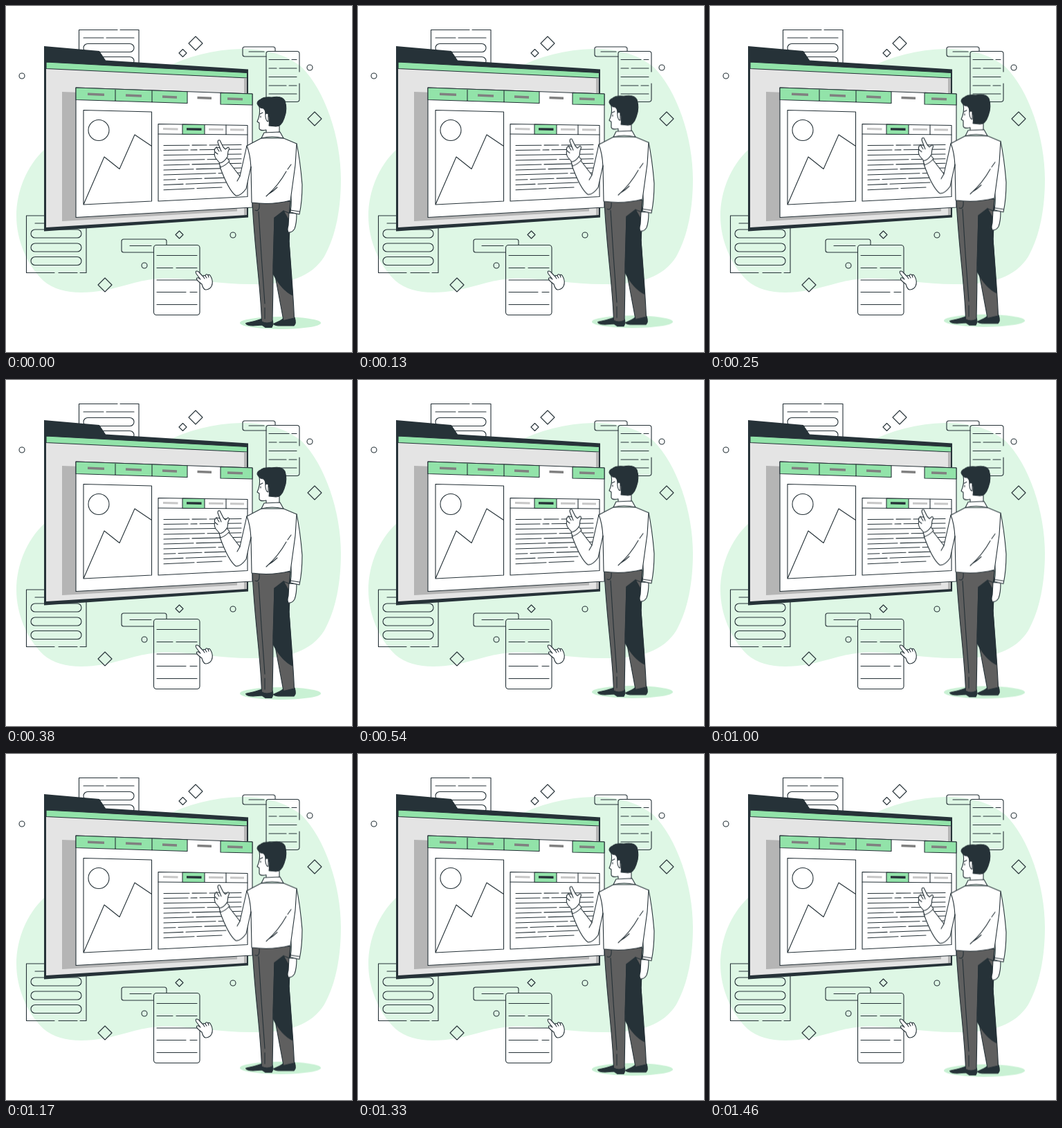
Write an HTML page without scripts that moves like this. It is 500 by 500 pixels and loops after 1.5 s.

```html
<!DOCTYPE html>
<html lang="en">
<head>
<meta charset="utf-8">
<title>Man at a tabbed window</title>
<style>
  html, body { margin: 0; width: 100%; height: 100%; overflow: hidden; background: #fff; }
  svg { display: block; width: 100vw; height: 100vh; }
  .line { fill: none; stroke: #263238; stroke-width: 1.1; stroke-linecap: round; stroke-linejoin: round; }
  .white { fill: #fff; }
  .green { fill: #92e3a9; }
  .dark { fill: #263238; }
  .grey { fill: #5f5f5f; }
  .bar { fill: none; stroke: #808080; stroke-width: 3.4; }
  .pale { stroke: #c7c7c7; stroke-width: 3; }
  .man { animation: float 1.5s linear infinite; }
  @keyframes float { 50% { transform: translateY(-10px); } }
</style>
</head>
<body>
<svg viewBox="0 0 500 500">
  <defs>
    <path id="diamond" class="line" d="M0-10 10 0 0 10-10 0Z"/>
    <path id="small-diamond" class="line" d="M0-5.5 5.5 0 0 5.5-5.5 0Z"/>
    <circle id="ring" class="line" r="4"/>
    <rect id="pill" class="line" width="73" height="12" rx="6"/>
  </defs>

  <path fill="#def7e5" d="M55 208C30 231 15 268 15 303C15 338 30 374 54 397C75 415 106 417 141 411C174 405 190 396 222 394C265 392 310 403 360 402C408 402 441 392 460 362C477 332 484 292 484 250C484 190 461 122 427 88C402 68 372 62 340 62C300 63 262 72 225 92Z"/>

  <!-- Cards -->
  <g class="line">
    <path d="M105.500 90V34.500H161M165 34.500H192V90M112 46H141M145 46H185"/>
    <path d="M29.500 303V385.500H70M76 385.500H103M107 385.500H116V303H29.500M42 314H56"/>
    <path d="M213.500 356H170Q167 356 167 353V340Q167 337 170 337H229Q232 337 232 340V345.500M179 346.500H210"/>
    <rect x="213.500" y="345.500" width="66.500" height="101" rx="4"/>
    <path d="M218 360.500H276M218 378.500H241M246 378.500H276M218 396H276M218 413.500H260M266 413.500H276M218 431.500H276"/>
    <path d="M376 73H345Q342 73 342 70V62Q342 59 345 59H386Q389 59 389 62V65.500M351 66H373"/>
    <path d="M424 95V69Q424 65.500 420.500 65.500H379.500Q376 65.500 376 69V135Q376 138.500 380 138.500H420Q424 138.500 424 135V112"/>
    <path d="M380 77.500H409M413 77.500H420M380 90H391M395 90H420M380 102.500H420M380 115H405M409 115H420M380 127H420"/>
  </g>
  <use href="#pill" x="112" y="54.500"/>
  <use href="#pill" x="112" y="73.500"/>
  <use href="#pill" x="36" y="323"/>
  <use href="#pill" x="36" y="343"/>
  <use href="#pill" x="36" y="362.500"/>

  <use href="#diamond" x="274" y="54"/>
  <use href="#diamond" x="446" y="163"/>
  <use href="#diamond" x="143" y="403"/>
  <use href="#small-diamond" x="255.500" y="68"/>
  <use href="#small-diamond" x="250.500" y="330.500"/>
  <use href="#ring" x="23" y="101"/>
  <use href="#ring" x="439" y="89"/>
  <use href="#ring" x="328" y="331"/>
  <use href="#ring" x="200" y="375"/>

  <!-- Pointer -->
  <path class="line white" d="M283 402 278 398Q274 394 276 393Q278 392 281 395L275 387Q273 383 276 383Q278 383 280 386L285 391Q285 388 288 390Q289 386 292 389Q294 387 296 391Q300 398 297 405Q294 410 288 410Q285 409 283 402ZM285 391 287 394M288 390 290 393M292 389 293 392"/>

  <!-- Window -->
  <path class="dark" d="M55 58 135 65 144 78.500 350 91.500V305.500L55 325.500Z"/>
  <path fill="#e4e4e4" d="M58 90 348 104V302L58 320Z"/>
  <path class="line green" d="M58 81 348.500 96.500V104L58 90.500Z"/>
  <path fill="#b5b5b5" d="M81 124 334 133V296.500L81 311ZM344 104.500H348V302H344Z"/>

  <!-- Page -->
  <path class="line white" d="M101 118 356 127V291L101 305.500Z"/>
  <path class="line green" d="M101 118 262 123.700V140.500L101 135.500ZM158 120V137.300M211 121.900V139M310 125.400 356 127V143L310 142Z"/>
  <path class="bar" d="M118 127.300 142 128.300M173 129 196 130M226 131 247 132M276.500 132.500 297 133.300M320 134 342 134.800"/>
  <path class="line" d="M112 150.500 210.500 153V282L112 287ZL112 287 142 218 164 235.500 186 186 210.500 202.500"/>
  <circle class="line" cx="134" cy="179.500" r="15"/>

  <path class="line white" d="M220 170.500 349 172.500V275.500L220 282Z"/>
  <path class="line green" d="M255 171 287 171.500V185.500L255 185.300Z"/>
  <path class="line" d="M220 185 349 186M318 172V185.700"/>
  <path class="bar pale" d="M227 177.500 248.500 178M293 178.300 314 178.600M324 178.700 344 179"/>
  <path class="bar" style="stroke:#263238" d="M261 177.900 282.500 178.200"/>
  <path class="line" d="M228 201.500 265 201.200M269 201.100 290 201M294 201 340 200.500
    M228 208.500 263 208M267 208 276 207.900M280 207.800 340 207
    M228 215.500 340 214M228 223 287 221.800M291 221.700 340 220.700
    M228 230 265 229M269 228.900 340 227.300M228 237 271 235.700M275 235.600 340 234
    M228 244 303 241.800M307 241.700 340 241M228 251.200 245 250.700M249 250.500 283 249.200M287 249.100 340 247.500
    M228 258.500 256 257.400M260 257.200 318 255M228 265.700 272 263.700M276 263.500 312 262"/>

  <!-- Man -->
  <g class="man">
    <ellipse cx="396.500" cy="458" rx="58.500" ry="9" fill="#c9f1d4"/>
    <g class="line">
      <path class="dark" d="M370 452C363 455 352 457 346.500 458.500Q348 462 357 462L370 461 375 464.500H384Q387 460 385 454ZM402 450C399 455 390 457 386.500 459.500Q389 462 397 462H416Q420 459 417 450Z"/>
      <path class="grey" d="M388 300 411 282 409 340C411 370 415 412 416.500 451L401 454.500 386 374Z"/>
      <path class="grey" d="M356 284 411 282 409 303 388 306 386 374Q386 415 385 456Q377 460 369.500 456C368 405 359 350 356 284Z"/>
      <path class="dark" d="M388 306 401 296 411 305 409 340 414 418Q398 410 386 387Z"/>
      <path class="grey" d="M401 296 411 300 410 312Z"/>
      <path d="M366 285Q367 298 360 295M365 297Q369 365 374 430M374 436V452"/>
      <path class="white" d="M409 299 420 300Q420 314 417 322Q413 328 408 327Q406 323 408 317Z"/>

      <path class="white" d="M366 145Q368 157 363 167L366 169V177Q367 181 376 179V187H395V150Z"/>
      <path class="dark" d="M363 141Q363 137 368 135Q372 131 384 132Q399 129 403 137Q407 150 402 162Q398 174 390 174L380 173Q381 167 380 160L375 156Q375 150 372 148Q366 148 363 141Z"/>
      <path class="white" d="M379 156Q374 153 375 160Q376 167 379 167Z"/>
      <path d="M367 156 371 154M368 159V161"/>

      <path class="white" d="M420 199Q425 222 428 258Q428 282 424 301L411 298Q414 281 410 265V215Z"/>
      <path class="white" d="M348 202 369 191 401 191 420 199 418 230 411 281Q384 288 355 284L354 232 347 264Q339 275 332 274C324 268 317 254 309 232L321 224 338 246Z"/>
      <path class="white" d="M369 191 373 183 396 182 401 191Q384 187 369 191Z"/>
      <path d="M348 202Q353 214 354 234M338 246 334 253M412 229 407 236M405 239Q394 259 376 275M392 262Q386 268 379 272M411 295 424 297"/>
      <path class="white" d="M308 227Q314 226 319 219L323 224Q317 231 310 233Z"/>
      <path class="white" d="M309 227 303 220Q300 214 302 211Q300 207 304 204L309 205 306 197Q306 193 309 194L314 204 317 207 321 204Q324 205 321 210L320 218Q315 226 309 227Z"/>
      <path d="M309 205 311 210M304 204 308 210M302 211 306 214"/>
    </g>
  </g>
</svg>
</body>
</html>
```
